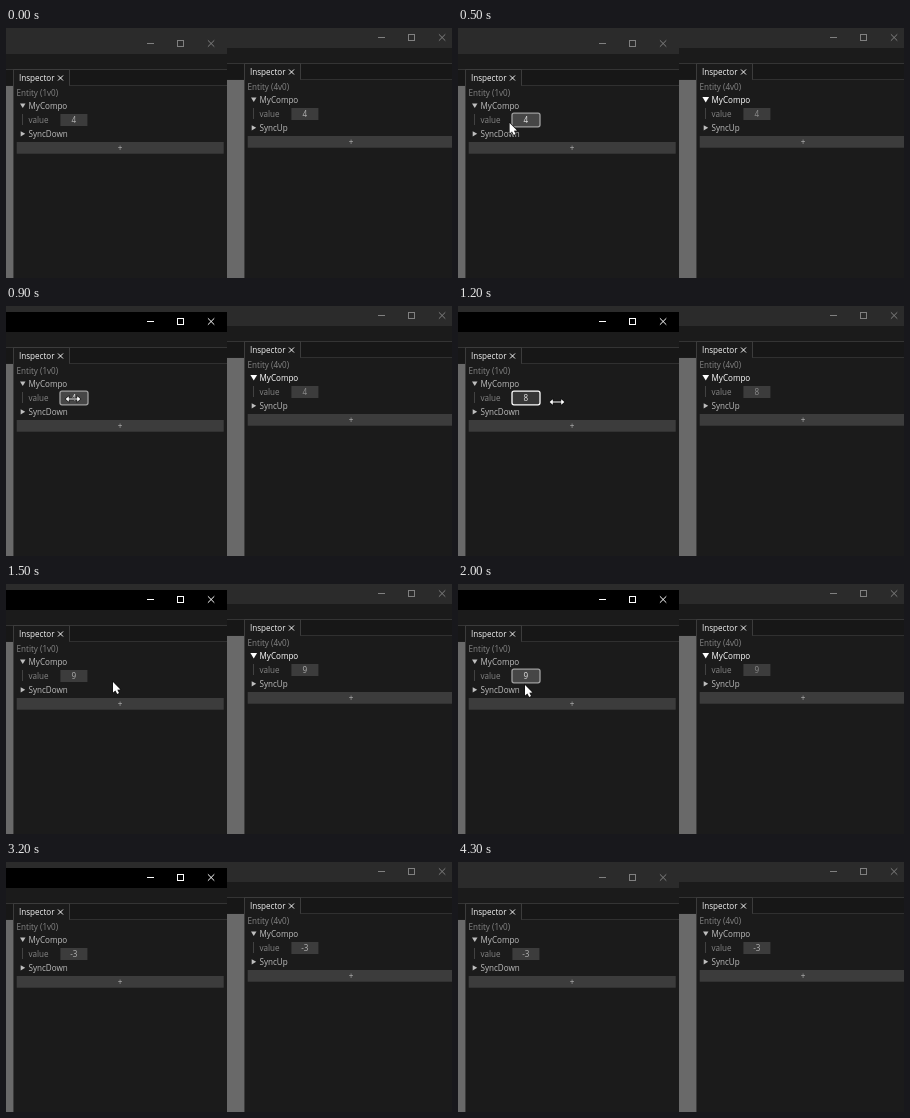
These frames come from a looping animation (446 by 250 pixels, 5300 ms). An HTML page with a canvas:

```html
<!DOCTYPE html>
<html lang="en">
<head>
<meta charset="utf-8">
<title>Inspector sync</title>
<style>
html, body { margin: 0; width: 100%; height: 100%; overflow: hidden; background: #1b1b1b; }
canvas { display: block; width: 446px; height: 250px; }
</style>
</head>
<body>
<canvas id="stage" width="446" height="250"></canvas>
<script>
const ctx = document.getElementById('stage').getContext('2d');
const LOOP = 5300, STEP = 100;
const FONT = '8.1px "Open Sans", "Noto Sans", sans-serif';
const GRAB_X = 67, PX_PER_UNIT = 8;
const BOTTOM = 256;

// Pointer path, one pose per step: [x, y, pointer shape, field state]
const PATHS = [
  { start: 200, poses: [
    [331, 67, 'arrow'], [132, 88, 'arrow'], [48, 97, 'arrow'], [51.6, 95, 'arrow', 'hover'],
    [61, 93, 'arrow', 'hover'], [66, 93, 'resize', 'hover'], [67, 93, 'resize', 'hover'],
    [67, 93, 'resize', 'hover'], [75, 93, 'resize', 'drag'], [86, 94, 'resize', 'drag'],
    [99, 96, 'resize', 'drag'], [107, 97, 'resize', 'drag'], [107, 97, 'arrow'],
    [107, 98, 'arrow'], [107, 103, 'arrow'], [98, 110, 'arrow'], [83, 111, 'arrow'],
    [71, 108, 'arrow'], [67, 101, 'arrow', 'hover'], [67, 95, 'resize', 'hover'],
    [62, 95, 'resize', 'drag'], [55, 96, 'resize', 'drag'], [46, 97, 'resize', 'drag'],
    [33.6, 97, 'resize', 'drag'], [12, 97, 'resize', 'drag'], [-8, 97, 'resize', 'drag'],
    [-29, 97, 'resize'] ] },
  { start: 3100, poses: [[105, 224, 'arrow']] }
];

function poseAt(t) {
  for (const { start, poses } of PATHS) {
    const pose = poses[Math.floor((t - start) / STEP)];
    if (pose) return pose;
  }
  return [0, 0, null];
}

function valueAt(t, x) {
  const moved = Math.round((x - GRAB_X) / PX_PER_UNIT);
  if (t < 1000) return 4;
  if (t < 1400) return 4 + moved;
  if (t < 2200) return 9;
  if (t < 2800) return 9 + moved;
  return -3;
}

function rect(x, y, w, h, color) {
  ctx.fillStyle = color;
  ctx.fillRect(x, y, w, h);
}

function text(str, x, y, color, align = 'left') {
  ctx.font = FONT;
  ctx.textAlign = align;
  ctx.fillStyle = color;
  ctx.fillText(str, x, y);
}

function trace(points, closed) {
  ctx.beginPath();
  points.forEach(([x, y]) => ctx.lineTo(x, y));
  if (closed) ctx.closePath();
}

function polygon(points, color) {
  trace(points, true);
  ctx.fillStyle = color;
  ctx.fill();
}

function line(x1, y1, x2, y2, color, width = 1) {
  trace([[x1, y1], [x2, y2]]);
  ctx.strokeStyle = color;
  ctx.lineWidth = width;
  ctx.stroke();
}

function cross(x, y, r, color, width) {
  line(x - r, y - r, x + r, y + r, color, width);
  line(x - r, y + r, x + r, y - r, color, width);
}

function titleBar(left, right, active) {
  const ink = active ? '#ffffff' : '#808080';
  rect(left, 6, right - left, 20, active ? '#000000' : '#2b2b2b');
  line(141, 15.5, 148, 15.5, ink);
  ctx.strokeStyle = ink;
  ctx.strokeRect(171.5, 12.5, 6, 6);
  cross(205.1, 15.5, 3.2, ink, 1);
}

function dock(left, right) {
  const width = right - left;
  rect(left, 26, width, BOTTOM - 26, '#1b1b1b');
  rect(left, 42, width, 15, '#171717');
  rect(left, 58, 7 - left, BOTTOM - 58, '#696969');
  line(left, 41.5, right, 41.5, '#343434');
  line(63, 57.5, right, 57.5, '#303030');
  rect(8, 42, 55, 16, '#1b1b1b');
  trace([[7.5, BOTTOM], [7.5, 41.5], [63.5, 41.5], [63.5, 57.5]]);
  ctx.strokeStyle = '#3c3c3c';
  ctx.stroke();
  text('Inspector', 13, 53, '#f4f4f4');
  cross(54.5, 50, 2.5, '#f4f4f4', 1);
}

function field(value, state, dim) {
  const fill = { hover: '#464646', drag: '#373737' }[state] || '#3c3c3c';
  rect(54.4, 86, 27, 12, fill);
  if (state) {
    ctx.beginPath();
    ctx.roundRect(54, 85.2, 28, 13.6, 2);
    ctx.fillStyle = fill;
    ctx.fill();
    ctx.strokeStyle = state === 'drag' ? '#ffffff' : '#a0a0a0';
    ctx.lineWidth = 1.3;
    ctx.stroke();
  }
  text(String(value), 67.8, 95, dim ? '#8e8e8e' : state ? '#e6e6e6' : '#b4b4b4', 'center');
}

function inspector(entity, sync, value, opts) {
  const head = opts.lit ? '#ffffff' : '#bebebe';
  const grow = opts.lit ? 0.6 : 0;
  text(`Entity (${entity})`, 10.6, 68, '#858585');
  polygon([[14 - grow, 75.5 - grow], [19.5 + grow, 75.5 - grow], [16.75, 80 + grow]], head);
  text('MyCompo', 22.5, 81, head);
  line(16.5, 86, 16.5, 97, '#424242');
  text('value', 22.5, 95, '#858585');
  field(value, opts.state, opts.dim);
  polygon([[14.7, 103.2], [19.2, 105.8], [14.7, 108.4]], '#bebebe');
  text(sync, 22.5, 109, '#bebebe');
  rect(10.7, 114, 207, 11.7, '#3c3c3c');
  text('+', 114, 123, '#b4b4b4', 'center');
}

function pointerShape(points) {
  trace(points, true);
  ctx.lineWidth = 1.2;
  ctx.strokeStyle = '#101010';
  ctx.stroke();
  ctx.fillStyle = '#ffffff';
  ctx.fill();
}

function arrow(x, y) {
  pointerShape([[0, 0], [0, 10.5], [2.4, 8.4], [4.2, 12], [6, 11.1], [4.3, 7.7], [7.4, 7.4]]
    .map(([dx, dy]) => [x + dx, y + dy]));
}

function resize(x, y) {
  const half = [[-4.2, -0.6], [-4.2, -2.8], [-7.4, 0], [-4.2, 2.8], [-4.2, 0.6]];
  const mirrored = half.map(([dx, dy]) => [-dx, -dy]);
  pointerShape([...half, ...mirrored].map(([dx, dy]) => [x + dx, y + dy]));
}

function draw(t) {
  const [x, y, pointer, state] = poseAt(t);
  const value = valueAt(t, x);

  ctx.save();
  ctx.translate(231, -6);
  titleBar(-231, 215, false);
  dock(-231, 215);
  inspector('4v0', 'SyncUp', value, { lit: t >= 200 && t < 3100, dim: !!state });
  ctx.restore();

  titleBar(0, 221, t >= 800 && t < 4300);
  dock(0, 221);
  inspector('1v0', 'SyncDown', value, { state });

  if (pointer === 'arrow') arrow(x, y);
  if (pointer === 'resize') resize(x, y);
}

const begin = performance.now();
function tick() {
  draw((performance.now() - begin) % LOOP);
  requestAnimationFrame(tick);
}
tick();
</script>
</body>
</html>
```
